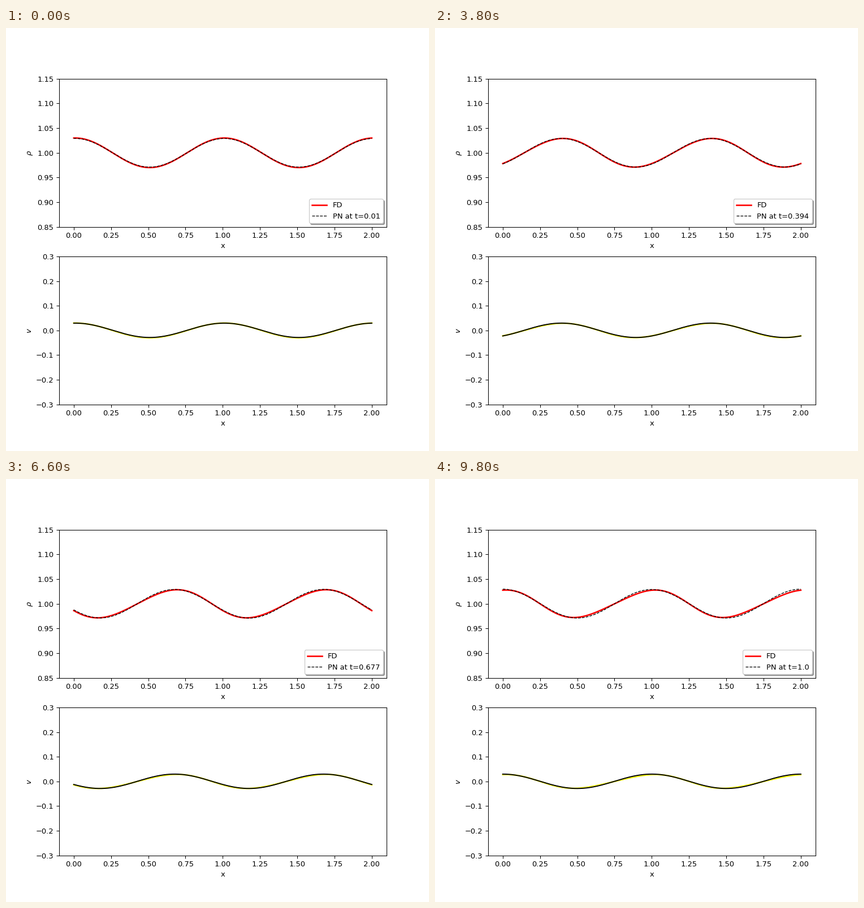
A matplotlib script that plays this animation: 748 by 748 pixels, repeating every 9.9 s.

```python
import numpy as np
import matplotlib.pyplot as plt
from matplotlib.animation import FuncAnimation

STEPS = 99
AMP = 0.03
K = 2 * np.pi
DAMPING = 0.087

x = np.linspace(0, 2, 400)


def fd_wave(t):
    """Damped travelling wave that slowly steepens (second harmonic)."""
    phase = K * (x - t)
    first = AMP * np.exp(-DAMPING * t)
    growth = (np.exp(-2 * DAMPING * t) - np.exp(-4 * DAMPING * t)) / (2 * DAMPING)
    second = AMP**2 * K / 2 * growth
    return first * np.cos(phase) + second * np.sin(2 * phase)


def pn_density(t):
    drift = 0.0007 * t * (x - 1) ** 2
    return 1 + 0.029 * np.cos(K * (x - t)) + drift


def pn_velocity(t):
    return 0.0006 + 0.0291 * np.cos(K * (x - t))


fig, (top, bottom) = plt.subplots(2, 1, figsize=(8, 8), dpi=93.5)
fig.subplots_adjust(left=0.125, right=0.9, bottom=0.11, top=0.88, hspace=0.2)

rho_fd, = top.plot(x, 1 + fd_wave(0), color="red", lw=2, label="FD")
rho_pn, = top.plot(x, pn_density(0), "k--", lw=1, label="PN at t=0.01")
v_fd, = bottom.plot(x, fd_wave(0), color="yellow", lw=2)
v_pn, = bottom.plot(x, pn_velocity(0), color="black", lw=1.5)

top.set(ylim=(0.85, 1.15), xlabel="x", ylabel=r"$\rho$")
bottom.set(ylim=(-0.3, 0.3), xlabel="x", ylabel="$v$")
legend = top.legend(loc="lower right", fancybox=True, shadow=True)


def update(i):
    t = (i + 1) / STEPS
    wave = fd_wave(t)
    rho_fd.set_ydata(1 + wave)
    rho_pn.set_ydata(pn_density(t))
    v_fd.set_ydata(wave)
    v_pn.set_ydata(pn_velocity(t))
    legend.get_texts()[1].set_text(f"PN at t={round(t, 3)}")
    return rho_fd, rho_pn, v_fd, v_pn, legend


anim = FuncAnimation(fig, update, frames=STEPS, interval=100,
                     repeat=True, repeat_delay=0, blit=False)
plt.show()
```
